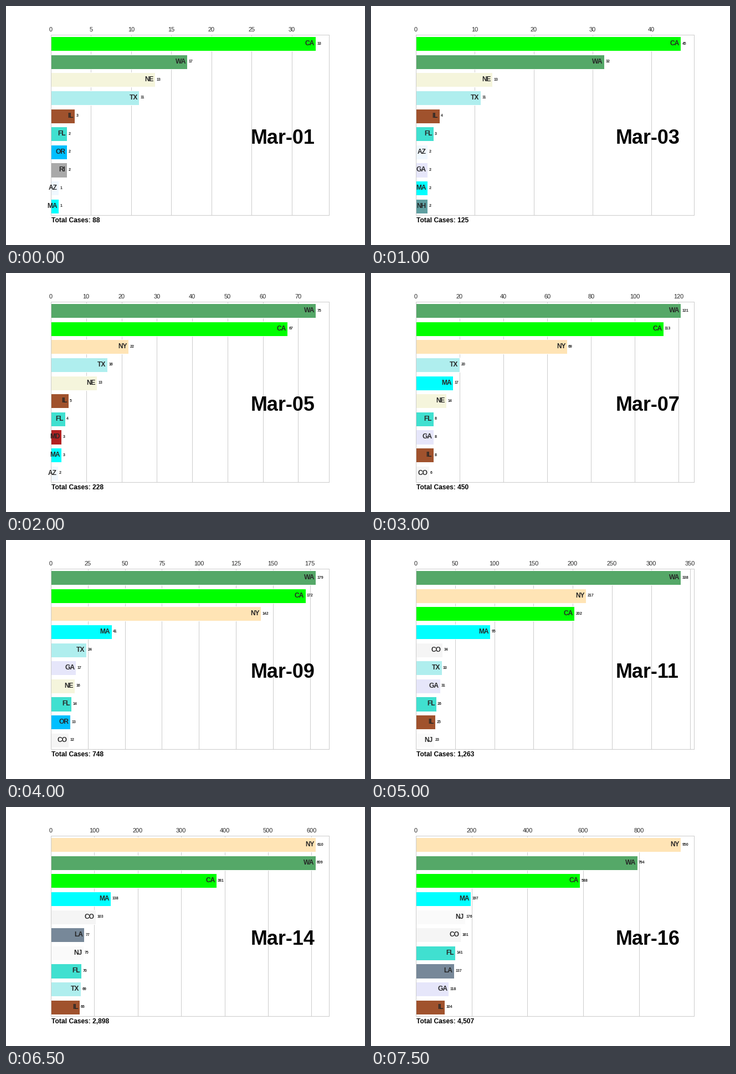
Animation of 648 by 432 pixels, one loop 8000 ms. Source, as a matplotlib script:

```python
import numpy as np
import matplotlib.pyplot as plt
from matplotlib.animation import FuncAnimation

plt.rcParams.update({
    "font.family": "Liberation Sans",
    "text.color": ".15",
    "xtick.color": ".15",
    "xtick.labelsize": 11,
    "axes.edgecolor": ".8",
    "axes.linewidth": 1,
    "axes.axisbelow": True,
    "grid.color": ".8",
    "grid.linewidth": 1,
})

TOP = 10
DAYS = np.arange(1, 17)
KEY_DAYS = [1, 3, 5, 9, 11, 14, 16]

# Colour and key counts; a short row stays at its last count.
# Rows follow the full state names, which settles ties.
STATES = {
    "AZ": ("aliceblue", 1, 2),
    "CA": ("lime", 33, 45, 67, 172, 202, 381, 588),
    "CO": ("whitesmoke", 0, 0, 2, 12, 34, 103, 161),
    "FL": ("turquoise", 2, 3, 4, 14, 26, 70, 141),
    "GA": ("lavender", 0, 2, 2, 17, 31, 64, 118),
    "IL": ("sienna", 3, 4, 5, 11, 25, 66, 104),
    "LA": ("lightslategray", 0, 0, 0, 1, 13, 77, 137),
    "MD": ("firebrick", 0, 0, 3),
    "MA": ("cyan", 1, 2, 3, 41, 95, 138, 197),
    "NE": ("beige", 13, 13, 13, 16),
    "NH": ("cadetblue", 0, 2),
    "NJ": ("#fafafa", 0, 0, 2, 11, 23, 75, 176),
    "NY": ("moccasin", 1, 2, 22, 142, 217, 610, 950),
    "OR": ("deepskyblue", 2, 2, 2, 13),
    "RI": ("darkgray", 2),
    "TX": ("paleturquoise", 11, 11, 16, 24, 33, 69, 87),
    "WA": ("#55a868", 17, 32, 75, 179, 338, 609, 794),
}


def grow(days, counts):
    """Quadratic growth between key counts."""
    roots = np.interp(DAYS, days[:len(counts)], np.sqrt(counts))
    return np.rint(roots ** 2).astype(int)


COLORS = {state: color for state, (color, *_) in STATES.items()}
CASES = {state: grow(KEY_DAYS, counts)
         for state, (_, *counts) in STATES.items()}
TOTALS = grow([1, 3, 5, 9, 10, 11, 14, 16],
              [88, 125, 228, 748, 1018, 1263, 2898, 4507])

fig = plt.figure(figsize=(9, 6), dpi=72, facecolor="white")
ax = fig.add_axes([0.125, 0.125, 0.775, 0.755])


def caption(x, y, text, size):
    ax.text(x, y, text, transform=ax.transAxes, size=size,
            weight="bold", color="black")


def draw(i):
    ax.clear()
    ranked = sorted(STATES, key=lambda s: -CASES[s][i])[:TOP]
    values = [CASES[s][i] for s in ranked]
    gap = values[0] / 200

    ax.barh(range(TOP), values, height=0.8, edgecolor="white", linewidth=1,
            color=[COLORS[s] for s in ranked])
    for row, (state, value) in enumerate(zip(ranked, values)):
        ax.text(value - gap, row, state, size=12, weight="bold",
                ha="right", va="center")
        ax.text(value + gap, row, f"{value}", size=7, weight="bold",
                ha="left", va="center")

    ax.set_xlim(0, values[0] * 1.05)
    ax.set_ylim(TOP - 0.5, -0.5)
    ax.set_yticks([])
    ax.xaxis.set_ticks_position("top")
    ax.tick_params(axis="x", length=0, pad=3.5)
    ax.grid(True, axis="x")

    caption(0.719, 0.396, f"Mar-{DAYS[i]:02d}", 36)
    caption(0.002, -0.0412, f"Total Cases: {TOTALS[i]:,}", 12)


anim = FuncAnimation(fig, draw, frames=len(DAYS), init_func=lambda: None,
                     interval=500, repeat=True, repeat_delay=0)
plt.show()
```
